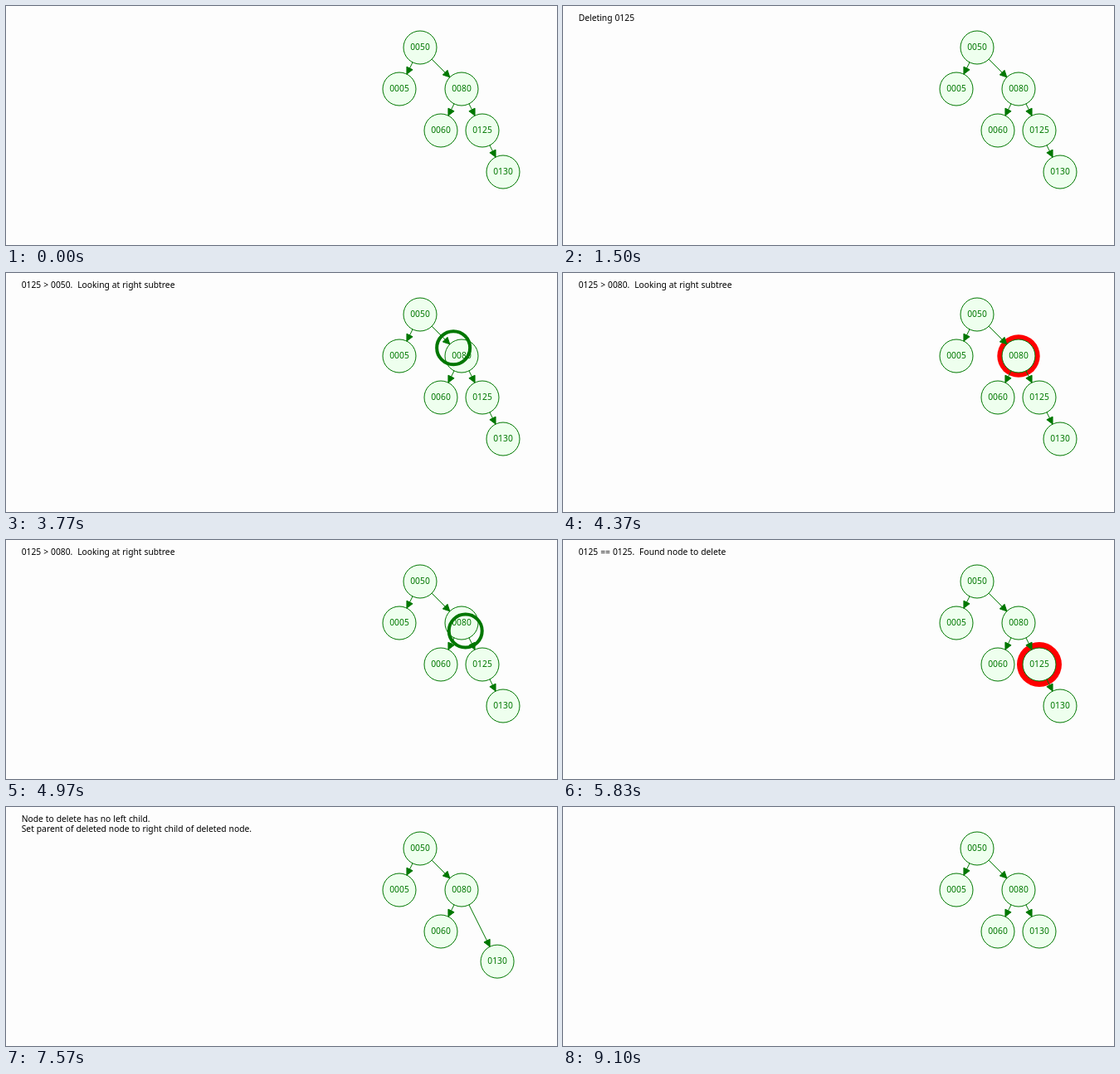
Animation, 664 px wide and 288 px high, one loop 9240 ms. Source, as an HTML page:

```html
<!DOCTYPE html>
<html lang="en">
<head>
<meta charset="utf-8">
<title>Deleting from a binary search tree</title>
<style>
  html, body { margin: 0; width: 100%; height: 100%; overflow: hidden; background: #fdfdfd; }
  svg { display: block; width: 664px; height: 288px; font: 10.3px "Noto Sans", "Open Sans", sans-serif; }
  text { white-space: pre; word-spacing: 0.25px; }
  .node circle { fill: #efe; stroke: #070; }
  .node text { fill: #070; text-anchor: middle; }
  .node .halo { fill: #f00; stroke: none; }
  .edge { fill: #070; stroke: #070; }
  #cursor { fill: none; stroke: #070; stroke-width: 4; }
</style>
</head>
<body>
<svg viewBox="0 0 664 288">
  <g id="nodes"></g>
  <circle id="cursor" r="20"/>
  <g id="edges"></g>
  <text id="line1" x="18.7" y="18"></text>
  <text id="line2" x="18.7" y="30"></text>
</svg>
<script>
const LOOP = 9240, R = 20;
const STEP = 866, SEARCH = 2270;          // five equal search steps
const RELINK = SEARCH + 5 * STEP, SHIFT = 7330, DONE = 8200;

const $ = id => document.getElementById(id);
const lerp = (a, b, p) => a + (b - a) * p;
const clamp = p => Math.max(0, Math.min(1, p));
const show = (el, on) => el.setAttribute('visibility', on ? 'visible' : 'hidden');

function add(parent, tag, attrs = {}) {
  const el = document.createElementNS('http://www.w3.org/2000/svg', tag);
  set(el, attrs);
  return parent.appendChild(el);
}
function set(el, attrs) {
  for (const k in attrs) el.setAttribute(k, attrs[k]);
}

const nodes = {};
for (const [key, x, y] of [
  ['0050', 499, 50], ['0005', 474, 100], ['0080', 549, 100],
  ['0060', 524, 150], ['0130', 599, 200], ['0125', 574, 150]
]) {
  const g = add($('nodes'), 'g', { class: 'node' });
  const halo = add(g, 'circle', { class: 'halo' });
  add(g, 'circle', { r: R });
  add(g, 'text', { y: 3.2 }).textContent = key;
  nodes[key] = { x, y, g, halo };
}

// Each edge is visible from one time to another
const edges = [
  ['0050', '0005', 0, LOOP], ['0050', '0080', 0, LOOP], ['0080', '0060', 0, LOOP],
  ['0080', '0125', 0, RELINK], ['0125', '0130', 0, SHIFT], ['0080', '0130', RELINK, LOOP]
].map(([a, b, from, to]) => {
  const g = add($('edges'), 'g', { class: 'edge' });
  return { a: nodes[a], b: nodes[b], from, to, g, line: add(g, 'line'), head: add(g, 'path') };
});

const messages = [
  [0, ''],
  [1470, 'Deleting 0125'],
  [SEARCH, '0125 > 0050.  Looking at right subtree'],
  [SEARCH + 2 * STEP, '0125 > 0080.  Looking at right subtree'],
  [SEARCH + 4 * STEP, '0125 == 0125.  Found node to delete'],
  [RELINK, 'Node to delete has no left child.',
    'Set parent of deleted node to right child of deleted node.'],
  [DONE, '']
];
const path = ['0050', '0080', '0125'].map(k => nodes[k]);

function drawEdge({ a, b, line, head }) {
  const dx = b.x - a.x, dy = b.y - a.y, len = Math.hypot(dx, dy);
  const u = dx / len, v = dy / len;
  const x = b.x - u * R, y = b.y - v * R;
  set(line, { x1: a.x + u * R, y1: a.y + v * R, x2: x, y2: y });
  const bx = x - u * 8, by = y - v * 8;
  set(head, { d: `M${x} ${y}L${bx - v * 4} ${by + u * 4}L${bx + v * 4} ${by - u * 4}Z` });
}

function render(t) {
  const step = Math.floor((t - SEARCH) / STEP);
  const active = step >= 0 && step < 5;

  // The halo pulses between 3 and 7 pixels
  const phase = (t + 1138) / 1742 % 1;
  path.forEach((n, i) => {
    show(n.halo, step === 2 * i);
    n.halo.setAttribute('r', R + 3 + 4 * Math.abs(2 * phase - 1));
  });

  const moving = active && step % 2 === 1;
  show($('cursor'), moving);
  if (moving) {
    const i = (step - 1) / 2, p = clamp((t - SEARCH) / STEP - step + 0.07);
    set($('cursor'), {
      cx: lerp(path[i].x, path[i + 1].x, p),
      cy: lerp(path[i].y, path[i + 1].y, p)
    });
  }

  const p = clamp((t - SHIFT) / (DONE - SHIFT));
  nodes['0130'].x = lerp(599, 574, p);
  nodes['0130'].y = lerp(200, 150, p);
  for (const n of Object.values(nodes)) n.g.setAttribute('transform', `translate(${n.x} ${n.y})`);
  nodes['0125'].g.style.display = t < SHIFT ? '' : 'none';

  for (const e of edges) {
    const on = t >= e.from && t < e.to;
    show(e.g, on);
    if (on) drawEdge(e);
  }

  const [, first, second = ''] = messages.filter(m => m[0] <= t).pop();
  $('line1').textContent = first;
  $('line2').textContent = second;
}

const start = performance.now();
function tick() {
  render((performance.now() - start) % LOOP);
  requestAnimationFrame(tick);
}
tick();
</script>
</body>
</html>
```
